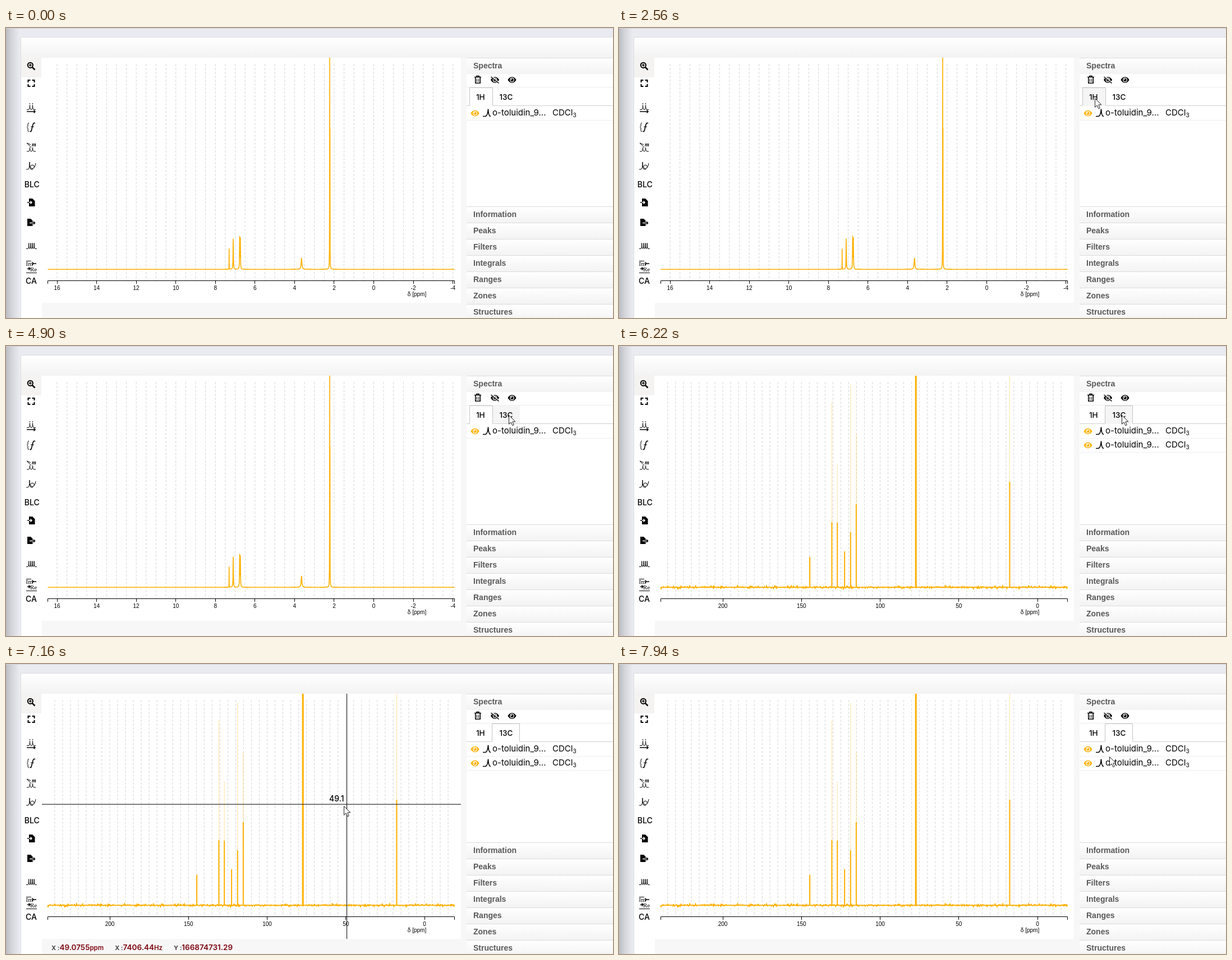
An HTML page that plays this animation: 1082 px wide and 517 px high, repeating every 8000 ms.

```html
<!DOCTYPE html>
<html lang="en">
<head>
<meta charset="utf-8">
<title>NMR spectra viewer</title>
<style>
html, body { margin: 0; width: 100%; height: 100%; overflow: hidden; background: #eaebf0; }
svg { display: block; }
text { font: 500 14px Inter, sans-serif; white-space: pre; }
.head { font: bold 14px "Liberation Sans", Arial, sans-serif; fill: #595959; }
.tick { font: 10px "Liberation Sans", Arial, sans-serif; text-anchor: middle; }
.serif { font: 11px "Liberation Serif", serif; }
.sign { font: italic bold 10px "Liberation Serif", serif; }
.tab { font-size: 13.5px; }
.row { font-size: 15px; font-weight: 400; }
.key { font-size: 11px; font-weight: 700; fill: #444; }
.num { font-size: 13.5px; font-weight: 600; fill: #7c0510; }
.unit { font-size: 11.5px; font-weight: 600; fill: #7c0510; }
.line { fill: none; stroke: #000; }
.white { stroke: #fff; }
.border { stroke: #c4c4c4; }
.peak { fill: none; stroke: #ffb000; stroke-linejoin: round; }
.grid { fill: none; stroke: #d6d6d6; stroke-dasharray: 4 3; }
</style>
</head>
<body>
<svg width="1082" height="517" viewBox="0 0 1082 517">
  <defs>
    <linearGradient id="edge">
      <stop stop-color="#bcbdc2"/><stop offset=".4" stop-color="#d3d4d9"/><stop offset="1" stop-color="#eaebf0"/>
    </linearGradient>
    <linearGradient id="bar" x2="0" y2="1">
      <stop stop-color="#fff"/><stop offset="1" stop-color="#f3f3f3"/>
    </linearGradient>
  </defs>
  <g id="base"></g>
  <g id="proton"></g>
  <g id="carbon"></g>
  <g id="tabs"></g>
  <g id="cross">
    <path class="line" id="hair"/>
    <text id="label"></text>
    <text x="81" y="509.5" id="readout"></text>
  </g>
  <circle id="click" r="12" fill="#ff0" fill-opacity=".47"/>
  <path id="cursor" d="M.5 .5V16.3L4.2 12.8 6.8 18.8 9.3 17.7 6.8 11.9H12Z" fill="#fff" stroke="#222"/>
</svg>
<script>
const $ = id => document.getElementById(id);
const rect = (x, y, w, h, fill) => `<rect x="${x}" y="${y}" width="${w}" height="${h}" fill="${fill}"/>`;
const line = (d, w = 1, cls = '') => `<path class="line ${cls}" d="${d}" stroke-width="${w}"/>`;
const solid = (d, fill = '#000') => `<path d="${d}" fill="${fill}"/>`;
const ring = (x, y, r, w) => `<circle class="line" cx="${x}" cy="${y}" r="${r}" stroke-width="${w}"/>`;
const text = (x, y, s, cls = '') => `<text x="${x}" y="${y}" class="${cls}">${s}</text>`;
const show = (id, on) => $(id).style.display = on ? '' : 'none';

let seed = 7;
const rnd = () => (seed = seed * 16807 % 2147483647) / 2147483647;

// A base line with n sharp peaks
const spikes = (x, y, n, w, h) =>
  `M${x} ${y}h3` + `q${w / 2} 0 ${w / 2} ${-h}q0 ${h} ${w / 2} ${h}`.repeat(n) + 'h3';

const eye = (x, y, c) => `<g transform="translate(${x} ${y})">
  ${solid('M-7.5 0C-4 -7 4 -7 7.5 0C4 7 -4 7 -7.5 0Z', c)}
  <circle r="3.9" fill="#fff"/><circle r="2.7" fill="${c}"/><circle cx="-1" cy="-1" r="1" fill="#fff"/></g>`;

const arrow = (x, y, w, cls) => line(`M${x} ${y}h${w}m-2.5 -2.5l2.5 2.5l-2.5 2.5`, 1.5, cls);

const row = y => eye(836, y + 1, '#ffb000')
  + line(`M850 ${y + 6.5}h4q4.5 0 5.5 -13q.5 13 4.5 13`, 1.6)
  + text(867, y + 5, 'o-toluidin_9...', 'row')
  + text(974, y + 5, 'CDCl<tspan font-size="10" dy="3">3</tspan>', 'row')
  + rect(821, y + 13, 261, 1, '#ededed');

const header = (y, s) =>
  rect(821, y, 261, 29, 'url(#bar)') + rect(821, y, 261, 1, '#dcdcdc') + text(833, y + 19, s, 'head');

const corner = a => `<g transform="rotate(${a} 45 98.5)">${line('M39.5 97v-4h4', 2)}</g>`;

const tools = [
  // zoom, full screen
  ring(43.3, 66.3, 4.6, 2) + line('M46.8 69.8l4.7 4.7', 2.6) + line('M40.8 66.3h5m-2.5 -2.5v5', 1.4),
  [0, 90, 180, 270].map(corner).join(''),
  // peaks, integrals, multiplets, phase
  line(spikes(37, 145.5, 2, 5, 8)) + line('M42.5 134v2m5 -2v2') + arrow(37, 149, 15),
  line('M41 169q-2 0 -2 3v2q0 2 -1.5 2.5q1.500 .5 1.500 2.500v3q0 3 2 3') + line('M52 170q-2.500 -2 -4 2l-2.500 10q-1 4 -3 2', 1.6) + line('M44 176h6'),
  line(spikes(37, 220, 2, 5, 7)) + line('M45 213l-8 -8l7 3') + text(46, 211, 'm', 'sign'),
  line(spikes(36, 252, 1, 6, 13)) + ring(47, 247.5, 3.3, 1) + line('M53 241q-1 6 -3 8'),
  text(32.7, 284, 'BLC'),
  // import, export
  solid('M41 304h6l4.5 4.5v9.5h-10.500z') + arrow(38, 311, 8) + arrow(41, 311, 5, 'white'),
  solid('M38 340h6l3.500 3.500v9.500h-9.500z') + line('M42 347.5h5', 1.5, 'white') + arrow(47, 347.5, 4.5),
  // stacked, real and imaginary part
  line(spikes(36, 393.5, 4, 3.2, 10)),
  line('M36 415.5h9M36 436.5h19') + arrow(54, 420, -5) + arrow(38, 429, 5) + text(35.5, 424, 'Im', 'serif') + text(43, 434, 'Re', 'serif'),
  text(35, 456, 'CA')
];

const panelIcons = line('M835 87.5h12M839 87v-1.500h4v1.500M836.8 88v10.300h8.400v-10.300', 1.6)
  + line('M839.5 90.5v5.500m3 0v-5.500')
  + eye(871.5, 92.5, '#000') + line('M865 86.5l14 12', 3, 'white') + line('M864.5 87l14 11.500', 1.5)
  + eye(902, 92.5, '#000');

$('base').innerHTML = rect(0, 0, 1082, 517, '#eaebf0') + rect(0, 0, 24, 517, 'url(#edge)') + rect(0, 0, 1082, 1, '#d2d3d8')
  + rect(26, 16, 1056, 501, '#dcdde0') + rect(27, 17, 1055, 36, 'url(#bar)')
  + rect(27, 53, 1055, 464, '#f7f7f7') + rect(27, 53, 37, 464, '#fff') + rect(27, 53, 36, 35, '#f4f3f2')
  + rect(64, 53, 747, 437, '#fff') + rect(821, 53, 261, 464, '#fff')
  + tools.join('') + header(53, 'Spectra') + rect(821, 82, 261, 23, '#fff') + panelIcons
  + rect(821, 105, 261, 1, '#ececec') + row(151)
  + ['Information', 'Peaks', 'Filters', 'Integrals', 'Ranges', 'Zones', 'Structures']
    .map((s, i) => header(318 + 29 * i, s)).join('');

// ppm runs from right to left
const protonX = ppm => 655.5 - 35.28 * ppm;
const carbonX = ppm => 746 - 2.805 * ppm;

function axis(toX, gridStep, tickStep, lo, hi) {
  let grid = '', ticks = 'M74.5 456V450.5H799.5V456', labels = '';
  for (let v = lo; v <= hi; v += gridStep) {
    const x = toX(v).toFixed(2);
    grid += `M${x} 64V450`;
    if (v % tickStep === 0) {
      ticks += `M${Math.floor(x) + .5} 450V456`;
      labels += text(x, 467, v, 'tick');
    }
  }
  return `<path class="grid" d="${grid}"/>` + line(ticks) + labels + text(732.5, 478, 'δ [ppm]', 'tick');
}

const peakPath = (d, w, opacity = 1) => `<path class="peak" d="${d}" stroke-width="${w}" opacity="${opacity}"/>`;
function trace(step, f) {
  let d = 'M74.5 430.2';
  for (let x = 75; x < 800; x += step) d += `L${x} ${(430.2 - f(x)).toFixed(1)}`;
  return d;
}

// Proton signals: ppm, height, half width
const signals = [[7.305, 36, .1], [7.1, 54, .35], [6.775, 56, .3], [6.74, 53, .3], [3.65, 20, .8], [2.225, 376, .15], [2.21, 220, .1]];
const lorentz = (x, [ppm, h, w]) => h / (1 + ((x - Math.round(protonX(ppm) * 4) / 4) / w) ** 2);
$('proton').innerHTML = axis(protonX, .5, 2, -4, 16)
  + peakPath(trace(.25, x => Math.min(377, signals.reduce((sum, s) => sum + lorentz(x, s), 0))), 1.6);

// Carbon signals: ppm, height, height of the second, paler spectrum
const stems = [[144.7, 54, 0], [130.7, 116, 329], [127.2, 115, 220], [122.6, 64, 0], [118.8, 98, 361], [115.2, 148, 274], [17.7, 188, 377]];
const stem = (ppm, h, w, opacity) => peakPath(`M${carbonX(ppm).toFixed(1)} 430v${-h}`, w, opacity);
$('carbon').innerHTML = axis(carbonX, 5, 50, -15, 235)
  + stems.map(([ppm, h, pale]) => stem(ppm, pale, 1.4, .28) + stem(ppm, h, 2)).join('') + stem(77.3, 377, 3)
  + peakPath(trace(.5, () => 4 * (rnd() - rnd()) ** 3), 1.8) + row(176);

// Pointer moves: start, end, goal, bend, easing; the pointer is redrawn every 78 ms
const tick = 78;
const out = k => 1 - (1 - k) ** 1.4, sine = k => Math.sin(k * Math.PI / 2);
const moves = [
  [300, 1080, [856, 198], [905, 300], out],
  [1160, 1160, [856, 196], [856, 197], out],
  [1480, 2250, [848, 131], [928, 215], out],
  [2320, 2560, [848, 125], [848, 127], out],
  [4680, 4900, [896, 123], [872, 123], out],
  [6690, 7160, [602.4, 252.9], [710.7, 191.1], out],
  [7469, 7940, [874, 165], [738.2, 209], sine]
];
function pointer(t) {
  const m = moves.findLastIndex(move => t >= move[0]);
  if (m < 0) return null;
  const [t0, t1, goal, bend, ease] = moves[m];
  const from = m ? moves[m - 1][2] : [970, 470];
  const last = Math.round((t1 - t0) / tick);
  const step = Math.min(last, Math.floor((t - t0) / ((t1 - t0) / last || 1)));
  const k = ease((step + 1) / (last + 1));
  return [0, 1].map(i => (1 - k) ** 2 * from[i] + 2 * k * (1 - k) * bend[i] + k * k * goal[i]);
}

// The crosshair trails the pointer by part of a step
function drawCross(t, at) {
  const before = pointer(t - tick);
  const [x, y] = before ? at.map((v, i) => before[i] + .66 * (v - before[i])) : [0, 0];
  const inside = x > 64 && x < 811;
  show('cross', inside);
  if (!inside) return;
  const ppm = (745 - x) / 2.805, level = 202508713.27 - (y - 208) * 845724.434;
  $('hair').setAttribute('d', `M${x + .25} 53V490M64 ${y}H811`);
  $('label').setAttribute('x', Math.round(x) - 31);
  $('label').setAttribute('y', Math.round(y) - 5);
  $('label').textContent = ppm.toFixed(1);
  const part = (key, num, unit, dx) => `<tspan class="key" dx="${dx}">${key} :</tspan>`
    + `<tspan class="num">${num}</tspan><tspan class="unit">${unit}</tspan>`;
  $('readout').innerHTML = part('X', ppm.toFixed(4), 'ppm', 0)
    + part('X', (ppm * 150.91933).toFixed(2), 'Hz', 20) + part('Y', level.toFixed(2), '', 20);
}

function drawTabs(active, at) {
  const tab = (i, x0, x1, s, tx) => {
    const hover = at && at[0] >= x0 && at[0] < x1 && at[1] > 105 && at[1] < 138;
    return rect(x0, 106, x1 - x0, active === i ? 33 : 32, hover ? '#f5f5f5' : '#fff')
      + (active === i ? line(`M${x0 + .5} 138.5V106.5H${x1 - .5}V138.5`, 1, 'border') : '')
      + text(tx, 127.5, s, 'tab');
  };
  $('tabs').innerHTML = rect(821, 138, 261, 1, '#cfcfcf') + tab(0, 826, 868, '1H', 838)
    + tab(1, active ? 866 : 868, 916, '13C', 879.5);
}

function frame(ms) {
  const t = ms % 8000, at = pointer(t), carbon = t >= 6220;
  show('proton', !carbon);
  show('carbon', carbon);
  drawTabs(+carbon, at);
  drawCross(t, at);
  show('cursor', at);
  show('click', t >= 3420 && t < 3570 || t >= 5530 && t < 5820);
  if (at) {
    const [x, y] = at.map(Math.round);
    $('cursor').setAttribute('transform', `translate(${x} ${y})`);
    $('click').setAttribute('cx', x + .5);
    $('click').setAttribute('cy', y);
  }
  requestAnimationFrame(frame);
}
requestAnimationFrame(frame);
</script>
</body>
</html>
```
